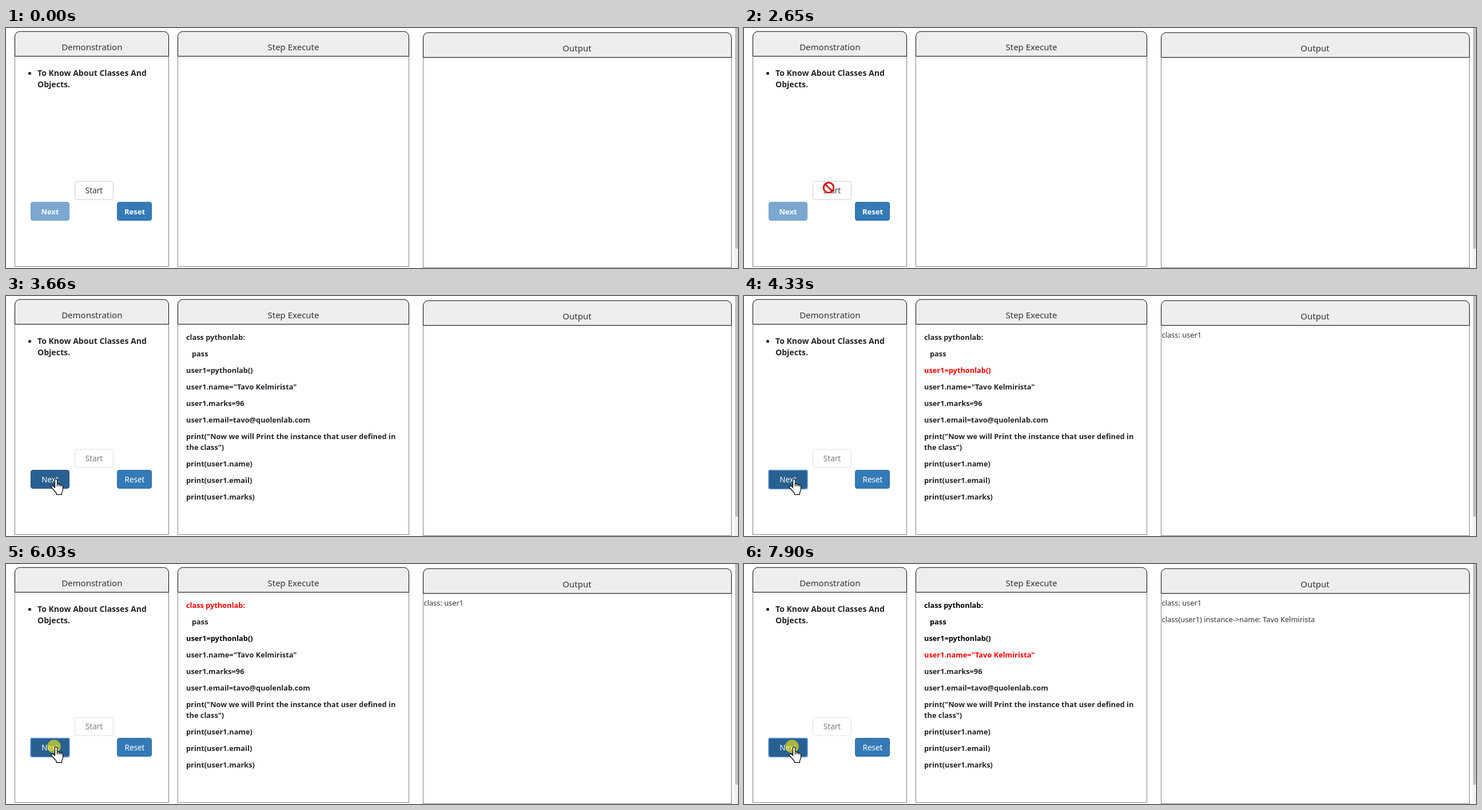
Recreate the animation shown at these times as an HTML page. Size 1280x421 px, loop 8 s.

```html
<!DOCTYPE html>
<html lang="en">
<head>
<meta charset="utf-8">
<title>Classes and objects</title>
<style>
  html, body { margin: 0; width: 100%; height: 100%; overflow: hidden; background: #fff; }
  svg { display: block; width: 100%; height: 100%; }
  text { font: 12.8px "Noto Sans", "Open Sans", sans-serif; fill: #333; white-space: pre; }
  .mid { text-anchor: middle; }
  .title { font-size: 15px; }
  .goal { font-size: 14.05px; font-weight: 700; fill: #212529; }
  .code text { font-weight: 700; fill: #212529; }
  .btn text { font-size: 13.5px; text-anchor: middle; }
  .blue text { fill: #fff; }
  .blue rect { fill: #337ab7; stroke: #2e6da4; }
  .head { fill: #eee; stroke: #000; }
  .body { fill: #fff; stroke: #808080; }

  /* One loop is 8 s, so 1% is 80 ms; every change is a hard cut. */
  .a { animation: 8s step-end infinite; }

  #cursor { animation-name: move; }
  #arrow { animation-name: arrow; }
  #hand { animation-name: hand; }
  #ban { animation-name: ban; }
  #click { animation-name: click; }
  @keyframes move {
    0% { transform: translate(955px, 395px); }
    8.625% { transform: translate(884px, 380px); }
    9.5% { transform: translate(811px, 363px); }
    13.375% { transform: translate(706px, 347px); }
    14.375% { transform: translate(580px, 329px); }
    15.25% { transform: translate(459px, 314px); }
    18.375% { transform: translate(354px, 298px); }
    19.375% { transform: translate(250px, 279px); }
    20.25% { transform: translate(156px, 259px); }
    22.125% { transform: translate(155px, 259px); }
    23.125% { transform: translate(153px, 264px); }
    24.125% { transform: translate(150px, 271px); }
    25% { transform: translate(147px, 276px); }
    26% { transform: translate(146px, 278px); }
    28% { transform: translate(148px, 280px); }
    40.875% { transform: translate(142px, 285px); }
    41.875% { transform: translate(128px, 296px); }
    42.875% { transform: translate(113px, 306px); }
    43.75% { transform: translate(100px, 313px); }
    44.75% { transform: translate(90px, 318px); }
    45.75%, 100% { transform: translate(84px, 320px); }
  }
  @keyframes arrow {
    0%, 24.125%, 43.75%, 100% { opacity: 0; }
    7.625%, 42.875% { opacity: 1; }
  }
  @keyframes hand {
    0%, 33.125% { opacity: 0; }
    24.125%, 43.75%, 100% { opacity: 1; }
  }
  @keyframes ban {
    0%, 42.875%, 100% { opacity: 0; }
    33.125% { opacity: 1; }
  }
  @keyframes click {
    0%, 30.25%, 51.125%, 64.875%, 76.375%, 88.125% { opacity: 0; }
    29.125%, 49.25%, 63.75%, 75.375%, 87.125%, 98.75%, 100% { opacity: .62; }
  }

  #start { animation-name: disable; }
  #next { animation-name: enable; }
  #face { animation-name: press; }
  #ring { animation-name: focus; }
  .label { animation-name: thin; }
  @keyframes disable { 0% { opacity: 1; } 34%, 100% { opacity: .65; } }
  @keyframes enable { 0% { opacity: .65; } 34%, 100% { opacity: 1; } }
  @keyframes thin {
    0% { font-weight: 600; font-size: 13px; }
    34%, 100% { font-weight: 400; font-size: 13.5px; }
  }
  @keyframes focus { 0% { opacity: 0; } 53.25%, 100% { opacity: 1; } }
  @keyframes press {
    0% { fill: #337ab7; stroke: #2e6da4; }
    44.75%, 54.125%, 66%, 77.375%, 91%, 100% { fill: #286090; stroke: #204d74; }
    53.25%, 64.875%, 76.375%, 88.125% { fill: #204d74; stroke: #122b40; }
  }

  .code { animation-name: code; }
  #make { animation-name: make; }
  #class { animation-name: class; }
  #pass { animation-name: pass; }
  #name { animation-name: name; }
  #out1 { animation-name: out1; }
  #out2 { animation-name: out2; }
  @keyframes code { 0% { opacity: 0; } 34%, 100% { opacity: 1; } }
  @keyframes make { 0% { fill: #212529; } 54.125% { fill: #f00; } 66%, 100% { fill: #000; } }
  @keyframes class { 0% { fill: #212529; } 66% { fill: #f00; } 77.375%, 100% { fill: #000; } }
  @keyframes pass { 0% { fill: #212529; } 77.375% { fill: #f00; } 91%, 100% { fill: #000; } }
  @keyframes name { 0% { fill: #212529; } 91%, 100% { fill: #f00; } }
  @keyframes out1 { 0% { opacity: 0; } 54.125%, 100% { opacity: 1; } }
  @keyframes out2 { 0% { opacity: 0; } 91%, 100% { opacity: 1; } }
</style>
</head>
<body>
<svg viewBox="0 0 1280 421">
  <!-- panels -->
  <rect class="body" x="15.5" y="40.5" width="269" height="378"/>
  <path class="head" d="M15.5 49.5V15.1a9 9 0 0 1 9-9H275.5a9 9 0 0 1 9 9V49.5Z"/>
  <text class="title mid" x="150.3" y="38.5">Demonstration</text>
  <rect class="body" x="300.5" y="40.5" width="404" height="378"/>
  <path class="head" d="M300.5 49.5V15.1a9 9 0 0 1 9-9H695.5a9 9 0 0 1 9 9V49.5Z"/>
  <text class="title mid" x="502.5" y="38.5">Step Execute</text>
  <rect class="body" x="729.5" y="42.5" width="539" height="378"/>
  <path class="head" d="M729.5 51.5V17.1a9 9 0 0 1 9-9H1259.5a9 9 0 0 1 9 9V51.5Z"/>
  <text class="title mid" x="998.5" y="40.5">Output</text>

  <!-- scrollbar -->
  <rect x="1274" width="6" height="421" fill="#f1f1f1"/>
  <rect x="1275" width="5" height="387" fill="#c1c1c1"/>

  <!-- demonstration -->
  <circle cx="41.5" cy="79.5" r="2.6" fill="#212529"/>
  <text class="goal" x="55" y="84">To Know About Classes And</text>
  <text class="goal" x="55" y="104">Objects.</text>
  <g id="start" class="btn a">
    <rect x="120.5" y="269" width="67" height="32" rx="3.5" fill="#fff" stroke="#ccc"/>
    <text x="154" y="290">Start</text>
  </g>
  <g id="next" class="btn blue a">
    <rect id="face" class="a" x="43.5" y="305.5" width="67" height="32" rx="3.5"/>
    <text class="label a" x="77" y="326.5">Next</text>
  </g>
  <rect id="ring" class="a" x="43" y="305.5" width="68" height="33" rx="2" fill="none" stroke="#669fee" stroke-width="1.4"/>
  <g class="btn blue">
    <rect x="194.5" y="305.5" width="60" height="32" rx="3.5"/>
    <text class="label a" x="225" y="326.5">Reset</text>
  </g>

  <!-- program -->
  <g class="code a">
    <text id="class" class="a" x="315" y="77">class pythonlab:</text>
    <text id="pass" class="a" x="325" y="106">pass</text>
    <text id="make" class="a" x="315" y="135">user1=pythonlab()</text>
    <text id="name" class="a" x="315" y="164">user1.name="Tavo Kelmirista"</text>
    <text x="315" y="193">user1.marks=96</text>
    <text x="315" y="222">user1.email=tavo@quolenlab.com</text>
    <text x="315" y="250.5">print("Now we will Print the instance that user defined in</text>
    <text x="315" y="270">the class")</text>
    <text x="315" y="299">print(user1.name)</text>
    <text x="315" y="328">print(user1.email)</text>
    <text x="315" y="357">print(user1.marks)</text>
  </g>

  <!-- output -->
  <text id="out1" class="a" x="730.5" y="72.5">class: user1</text>
  <text id="out2" class="a" x="730.5" y="101.5">class(user1) instance-&gt;name: Tavo Kelmirista</text>

  <!-- cursor, hotspot at 0,0 -->
  <g id="cursor" class="a" stroke-linejoin="round">
    <circle id="click" class="a" r="11.8" fill="#f0ea14"/>
    <path id="arrow" class="a" d="M.5.5V20L5 16L8 23.3L11 22L8 15H14.5Z" fill="#fff" stroke="#000"/>
    <g id="hand" class="a" fill="#fff" stroke="#000" stroke-width="1.2">
      <path d="M1.5 3Q1.5.6 3.5.6T5.5 3V10Q7.5 8.7 8.8 10.5Q11 9.8 12 11.6Q15.3 11 15.5 15V19Q15.5 22 13.5 25V28.300H4V25.500L-4 16.500Q-5.800 14-3.800 13Q-1.500 12.500 1.500 16Z"/>
      <path d="M5.500 10V14M8.800 10.500V14M12 11.600V14.500" fill="none"/>
    </g>
    <g id="ban" class="a" fill="#fff" stroke="#d60000" stroke-width="2.8">
      <circle r="8.8"/>
      <path d="M-6.2-6.2L6.2 6.2"/>
    </g>
  </g>
</svg>
</body>
</html>
```
